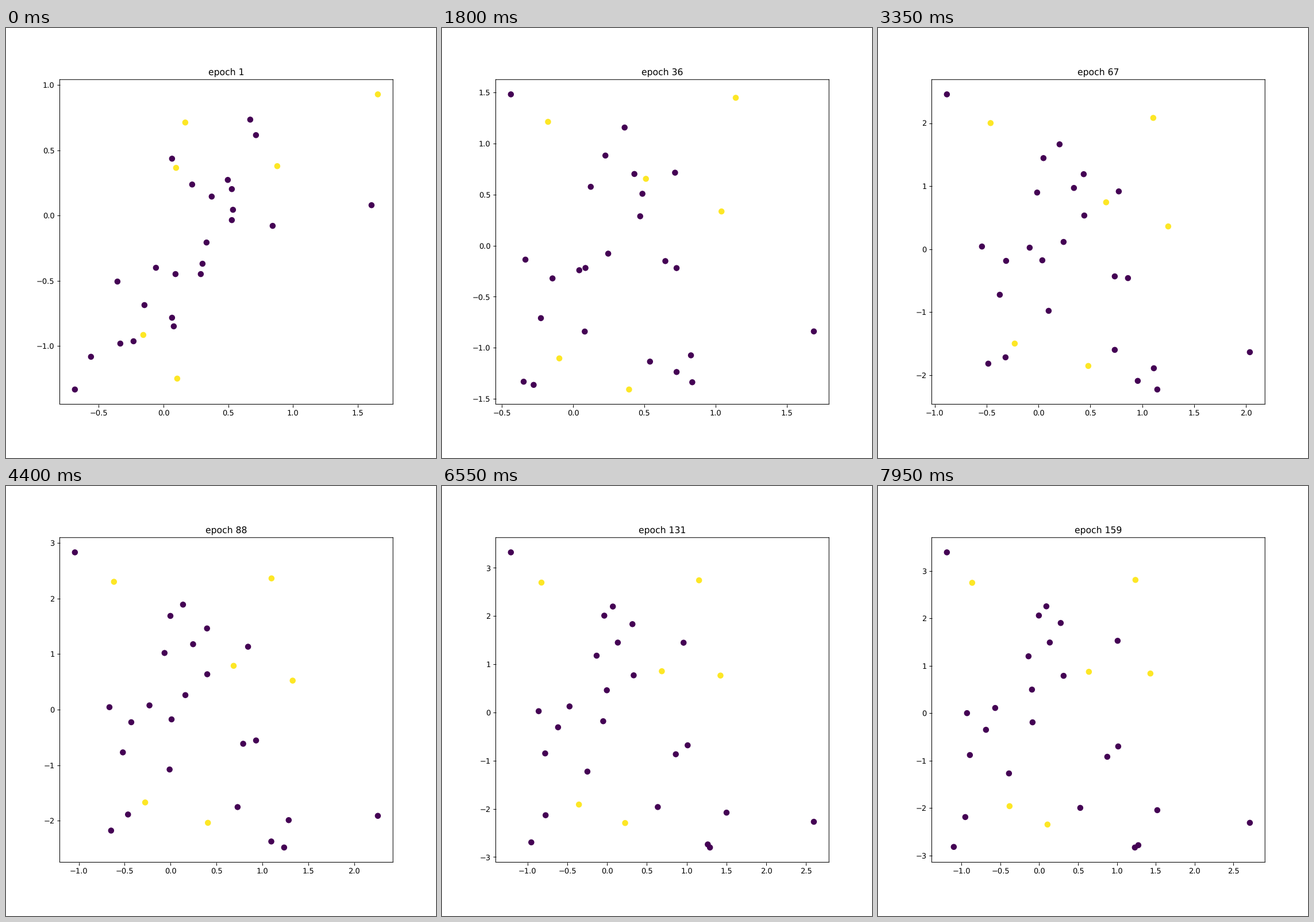
Animation of 748 by 748 pixels, one loop 8 s. Source, as a matplotlib script:

```python
import numpy as np
import matplotlib.pyplot as plt
from matplotlib.animation import FuncAnimation

SIZE, DPI = 748, 93.5
TICK, TICKS = 50, 160              # ms per tick, ticks per loop
PURPLE, YELLOW = "#440154", "#fde725"
FIRST, MIDDLE, LAST = 1, 67, 159   # epochs of the key poses
CENTER = np.array([0.5, 0.1])      # the cloud first shrinks towards this

# Each dot: its place on the stage, in pixels, in the three key poses
PURPLE_DOTS = [
    [(289, 227), (120, 115), (120, 115)],
    [(425, 159), (316, 202), (293, 209)],
    [(386, 264), (288, 226), (280, 225)],
    [(358, 293), (358, 254), (318, 238)],
    [(464, 344), (341, 278), (299, 272)],
    [(435, 186), (419, 284), (417, 269)],
    [(324, 272), (277, 286), (262, 296)],
    [(393, 334), (359, 326), (323, 330)],
    [(194, 441), (181, 380), (155, 395)],
    [(241, 482), (223, 405), (188, 424)],
    [(289, 504), (264, 382), (204, 386)],
    [(261, 417), (286, 404), (269, 411)],
    [(295, 428), (323, 372), (268, 354)],
    [(393, 280), (412, 432), (399, 471)],
    [(395, 316), (435, 435), (418, 453)],
    [(199, 549), (212, 464), (160, 468)],
    [(222, 545), (297, 492), (228, 500)],
    [(148, 572), (192, 584), (132, 628)],
    [(120, 629), (222, 573), (152, 576)],
    [(292, 519), (412, 560), (352, 560)],
    [(349, 373), (480, 592), (486, 564)],
    [(342, 410), (452, 614), (453, 625)],
    [(339, 428), (486, 629), (447, 629)],
    [(636, 308), (647, 564), (647, 586)],
]
YELLOW_DOTS = [
    [(647, 115), (479, 156), (448, 163)],
    [(296, 243), (196, 165), (164, 168)],
    [(312, 164), (397, 303), (367, 323)],
    [(472, 240), (505, 345), (474, 326)],
    [(239, 534), (238, 549), (229, 557)],
    [(298, 610), (366, 588), (295, 589)],
]


def to_data(pixels, low, high):
    """Map stage pixels to data, given the corners of the cloud."""
    unit = (pixels - [120, 629]) / [647 - 120, 115 - 629]
    return low + unit * (np.array(high) - low)


pixels = np.array(PURPLE_DOTS + YELLOW_DOTS, float)
colors = [PURPLE] * len(PURPLE_DOTS) + [YELLOW] * len(YELLOW_DOTS)
first = to_data(pixels[:, 0], (-0.685, -1.3345), (1.657, 0.929)) - CENTER
middle = to_data(pixels[:, 1], (-0.8825, -2.2267), (2.036, 2.457)) - CENTER
last = to_data(pixels[:, 2], (-1.1886, -2.8326), (2.711, 3.3935)) - CENTER


def cloud(epoch):
    """Blend the key poses; x and y have their own pace."""
    if epoch <= MIDDLE:
        v = (epoch - FIRST) / (MIDDLE - FIRST)
        smooth = v * v * (3 - 2 * v)
        grow = np.array([v ** 0.8, (v + smooth) / 2])
        squeeze = np.array([1.35, 1.05]) * v * (1 - v) ** 2
        return CENTER + (1 - grow - squeeze) * first + grow * middle
    u = (epoch - MIDDLE) / (LAST - MIDDLE)
    settle = 1 - (1 - u) ** np.array([1.25, 1.6])
    swing = np.array([0.45, 0.16]) * u * (1 - u)
    return CENTER - swing * first + (1 - settle + swing) * middle + settle * last


def span(values, margin=0.05):
    lo, hi = values.min(), values.max()
    pad = margin * (hi - lo)
    return lo - pad, hi + pad


plt.rcParams.update({"font.family": "DejaVu Sans", "path.snap": False,
                     "text.hinting": "none"})
fig = plt.figure(figsize=(SIZE / DPI, SIZE / DPI), dpi=DPI, facecolor="white")
ax = fig.add_axes([0.125, 0.125, 0.775, 0.755])
dots = ax.scatter(*cloud(FIRST).T, s=50, c=colors)
title = ax.set_title("epoch 1")


def draw(tick):
    epoch = max(FIRST, tick)       # the first epoch is held for two ticks
    xy = cloud(epoch)
    dots.set_offsets(xy)
    ax.set_xlim(*span(xy[:, 0]))
    ax.set_ylim(*span(xy[:, 1]))
    title.set_text(f"epoch {epoch}")
    return dots, title


anim = FuncAnimation(fig, draw, frames=TICKS, interval=TICK, repeat=True,
                     repeat_delay=0, blit=False)
plt.show()
```
